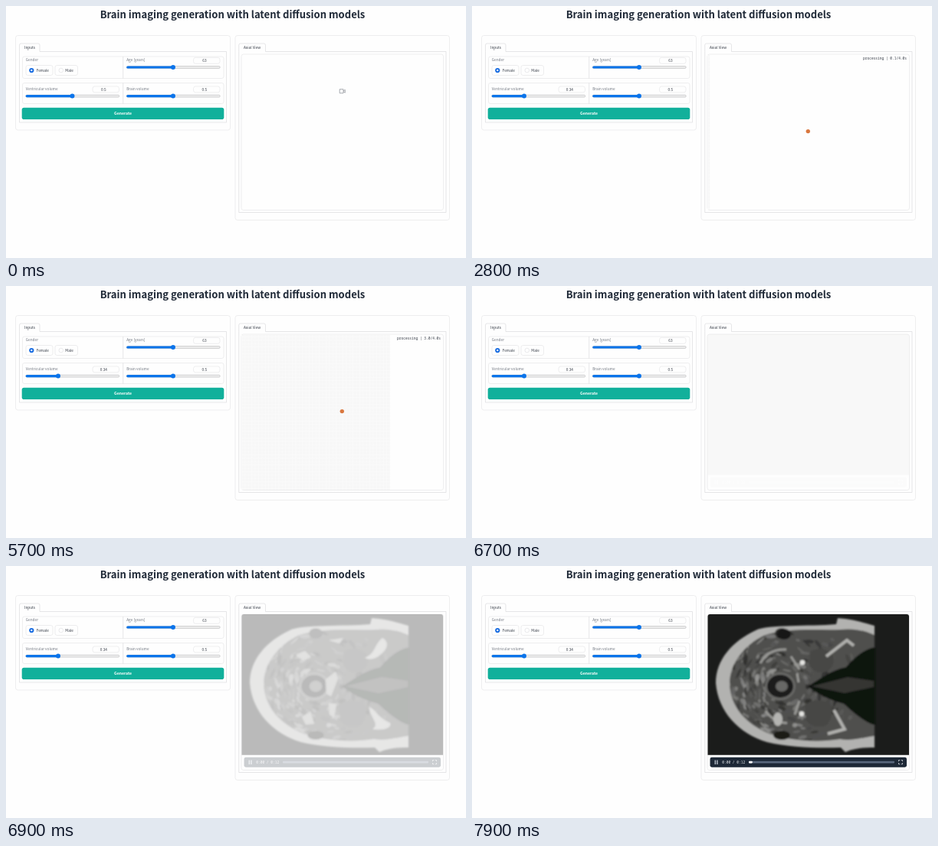
Animation, 600 px wide and 329 px high, one loop 8000 ms. Source, as an HTML page:

```html
<!DOCTYPE html>
<html lang="en">
<head>
<meta charset="utf-8">
<title>Brain imaging generation</title>
<style>
html, body { margin: 0; width: 100%; height: 100%; overflow: hidden; background: #fefefe; }
svg { display: block; width: 100vw; height: 100vh; }
text { font: 4.75px "Noto Sans CJK JP", "Noto Sans CJK SC", "Noto Sans CJK", "Open Sans", sans-serif; fill: #343a45; }
.title { font-size: 13.06px; font-weight: 600; fill: #1f2937; }
.label { fill: #737983; }
.mid { text-anchor: middle; }
.go { font-size: 5.1px; font-weight: 600; fill: #fff; }
.mono { font: 4.52px "Noto Sans Mono", "DejaVu Sans Mono", monospace; }
.box { fill: #fefefe; stroke: #e7e7e9; stroke-width: .7; }
.line { fill: none; stroke: #dcdcdf; stroke-width: .7; }
</style>
</head>
<body>
<svg viewBox="0 0 600 329" preserveAspectRatio="none">
  <defs>
    <pattern id="grid" width="4.4" height="4.4" patternUnits="userSpaceOnUse" x="307">
      <rect width="4.4" height="4.4" fill="#f7f7f7"/>
      <path d="M.4 0V4.4M0 .4H4.4" stroke="#fbfbfb" stroke-width=".8"/>
    </pattern>
    <filter id="soft" x="-10%" y="-10%" width="120%" height="120%"><feGaussianBlur stdDeviation="1.1"/></filter>
    <clipPath id="screen"><path d="M307.5 246.7V66Q307.5 63 310.5 63H567Q570 63 570 66V246.7Z"/></clipPath>
    <clipPath id="inside"><use href="#tissue"/></clipPath>
  </defs>

  <text class="title mid" x="295.5" y="15.7">Brain imaging generation with latent diffusion models</text>

  <rect class="box" x="12.5" y="38.5" width="280" height="123.5" rx="3"/>
  <path class="line" d="M17.5 59.5V51Q17.5 49 19.5 49H42Q44 49 44 51V59.5H287.5V152H17.5V59.5"/>
  <text x="24" y="56.3">Inputs</text>
  <rect class="box" x="21.5" y="66" width="262.5" height="28.5" rx="2.5"/>
  <rect class="box" x="21.5" y="100.5" width="262.5" height="27" rx="2.5"/>
  <path class="line" d="M152.7 66V94.5M152.7 100.5V127.5"/>
  <text class="label" x="25.8" y="72.3">Gender</text>
  <rect class="box" x="26" y="77.5" width="35" height="13" rx="2.5"/>
  <rect class="box" x="64" y="77.5" width="29.5" height="13" rx="2.5"/>
  <circle cx="33.3" cy="84" r="3.1" fill="#1268e0"/>
  <circle cx="33.3" cy="84" r="1.2" fill="#fff"/>
  <circle cx="71.8" cy="84" r="2.8" fill="#fff" stroke="#dcdce0" stroke-width=".6"/>
  <text x="39.7" y="85.8">Female</text>
  <text x="77.3" y="85.8">Male</text>
  <g id="sliders"></g>
  <rect x="20.7" y="132.8" width="263.6" height="15.2" rx="2.8" fill="#11b09b"/>
  <text class="go mid" x="152.5" y="142.4">Generate</text>

  <rect class="box" x="299" y="38.5" width="279.5" height="241" rx="3"/>
  <path class="line" d="M303.7 59.5V51Q303.7 49 305.7 49H336.5Q338.5 49 338.5 51V59.5H574V269.5H303.7V59.5"/>
  <text x="310" y="56.3">Axial View</text>
  <rect class="box" x="307" y="63" width="263.5" height="203.5" rx="2.8"/>
  <path id="camera" fill="none" stroke="#858990" stroke-width=".7" d="M435.2 108.7H440V113.8H435.2ZM440 110.8L442.3 109.4V113.2L440 111.8"/>

  <g id="busy">
    <rect id="fill" x="307" y="64" height="202" fill="url(#grid)"/>
    <circle cx="438.3" cy="163.6" r="2.7" fill="#d9773f"/>
    <text id="status" class="mono" x="567" y="69.5" text-anchor="end"></text>
  </g>

  <g id="video">
    <g clip-path="url(#screen)">
      <rect x="307" y="63" width="263" height="184" fill="#1b1c1b"/>
      <g id="scan" filter="url(#soft)">
        <path fill="#b2b2b0" d="M318 153C318 122 340 98 370 84C385 76 440 79 475 76L477 68C496 69 510 74 525 78V237C510 237 498 238 487 243L481 237C450 238 415 237 385 230C348 219 321 190 318 153Z"/>
        <path id="tissue" fill="#50504e" d="M336 152C337 126 356 103 380 91C410 80 450 84 480 83C498 81 512 84 525 90V222C510 224 496 229 480 226C450 231 415 228 388 219C358 207 336 184 336 152Z"/>
        <g id="mottle" clip-path="url(#inside)"></g>
        <path fill="#111211" d="M438 157C455 147 468 136 488 132C497 120 512 108 526 106V208C510 203 496 190 485 180C467 175 450 167 438 157Z"/>
        <path fill="#343533" d="M443 157L490 145L524 150V158L486 166Z"/>
        <path fill="#474745" d="M441 112Q456 103 470 115Q476 128 463 138Q448 142 440 130ZM434 181Q450 170 468 181Q473 196 462 208Q447 214 436 202Z"/>
        <ellipse cx="402" cy="157" rx="20" ry="18" fill="#686866"/>
        <ellipse cx="402" cy="157" rx="17" ry="15" fill="#1b1b1a"/>
        <ellipse cx="404" cy="157" rx="8" ry="7" fill="#686866"/>
        <ellipse cx="404" cy="88" rx="9" ry="7" fill="#2a2a29"/>
        <ellipse cx="404" cy="221" rx="11" ry="6" fill="#1a1a19"/>
        <g id="early">
          <path fill="#b1b1ae" d="M468 120C482 115 480 103 491 94C500 99 498 108 489 115C483 121 475 123 468 120ZM474 184C484 190 485 198 501 205C503 211 494 215 478 213C489 207 474 197 474 184Z"/>
          <path fill="#a0a09d" d="M378 116L390 111 398 119 387 123ZM386 197L397 190 402 206 391 207ZM421 97L440 94 435 101ZM417 148L430 138 433 147 424 170 418 167ZM421 179L431 180 428 198 422 194Z"/>
        </g>
        <g id="late">
          <path fill="none" stroke="#b0b0ad" stroke-width="4" d="M462 118L489 97L498 104M472 188L486 213L464 219"/>
          <path fill="none" stroke="#989895" stroke-width="3" d="M410 109C393 108 382 116 376 127M383 189C390 199 399 205 411 205M416 118L427 135M424 140L426 152M427 176L421 194"/>
          <ellipse cx="399" cy="200" rx="6" ry="9" fill="#b4b4b1"/>
          <ellipse cx="407" cy="89" rx="9" ry="7" fill="#151515"/>
          <circle cx="431" cy="126" r="3.2" fill="#e5e5e2"/>
          <circle cx="430" cy="193" r="3.2" fill="#e5e5e2"/>
        </g>
      </g>
    </g>
    <g id="bar">
      <rect x="310.5" y="249.7" width="256.5" height="13" rx="2.4" fill="#1d2836"/>
      <path stroke="#aeb6c1" stroke-width="1.5" d="M317.3 253.5V259M319.9 253.5V259"/>
      <text class="mono" x="326.3" y="257.9" style="fill:#e5e8ec">0:00 / 0:12</text>
      <rect x="361" y="254.8" width="190" height="2.6" rx=".8" fill="#59677c"/>
      <rect id="played" x="361" y="254.8" height="2.6" rx=".8" fill="#fff"/>
      <path fill="none" stroke="#d5d9df" stroke-width=".8" d="M556.5 255.2V253.5H558.2M559.8 253.5H561.5V255.2M561.5 257V258.7H559.8M558.2 258.7H556.5V257"/>
    </g>
  </g>
</svg>
<script>
const $ = id => document.getElementById(id);
const clamp = x => Math.max(0, Math.min(1, x));
const show = (el, on) => el.style.display = on ? '' : 'none';
const LOOP = 8000, START = 2700, DONE = 6600, PLAY = 7600;
const BLUE = '#0b74ea', HOVER = '#3c94ee';

function slider(x, y, label) {
  $('sliders').insertAdjacentHTML('beforeend', `
    <text class="label" x="${x}" y="${y - 7.8}">${label}</text>
    <rect class="box" x="${x + 87.3}" y="${y - 12.7}" width="34.5" height="8" rx="2.8"/>
    <text class="mid" x="${x + 101.7}" y="${y - 6.9}"></text>
    <rect x="${x}" y="${y - 1.4}" width="122" height="2.8" rx="1.4" fill="#efefef" stroke="#b6b6b8" stroke-width=".6"/>
    <rect x="${x}" y="${y - 1.6}" height="3.2" rx="1.6"/>
    <circle cy="${y}" r="3"/>`);
  const [text, , bar, thumb] = [...$('sliders').children].slice(-4);
  return (pos, color, shown) => {
    const length = 3 + pos * 115.5;
    text.textContent = shown;
    bar.setAttribute('width', length);
    thumb.setAttribute('cx', x + length);
    bar.setAttribute('fill', color);
    thumb.setAttribute('fill', color);
  };
}

slider(157.2, 80, 'Age [years]')(.5, BLUE, '63');
slider(157.2, 117.6, 'Brain volume')(.5, BLUE, '0.5');
const ventricles = slider(25.7, 117.6, 'Ventricular volume');
const drag = [.5, .46, .42, .38, .36, .35, .34];

// Seeded grey fibres that run around the centre of the head, darker to the right
let seed = 11;
const rnd = () => (seed = seed * 16807 % 2147483647) / 2147483647;
for (let i = 0; i < 330; i++) {
  const a = rnd() * 2 * Math.PI, r = 20 + rnd() * 55;
  const x = 404 + r * Math.cos(a) * (Math.cos(a) > 0 ? 1.6 : 1), y = 157 + r * Math.sin(a);
  const g = 35 + rnd() * (x > 435 ? 70 : 125) | 0;
  const turn = a * 180 / Math.PI + 60 + rnd() * 60;
  $('mottle').insertAdjacentHTML('beforeend',
    `<ellipse cx="${x}" cy="${y}" rx="${2 + rnd() * 6}" ry="${1 + rnd() * 2}" fill="rgb(${g},${g},${g - 2})" opacity=".75" transform="rotate(${turn} ${x} ${y})"/>`);
}

function draw(ms) {
  const t = Math.floor(ms % LOOP / 100) * 100;

  const v = drag[Math.max(0, Math.min(6, (t - 1400) / 100))];
  ventricles(v, t >= 1400 && t < 2300 ? HOVER : BLUE, String(v));

  show($('camera'), t < START);
  show($('busy'), t >= START && t < DONE);
  $('fill').setAttribute('width', 263 * clamp((t - START - 50) / 4000));
  $('status').textContent = `processing | ${((t - START) / 1000).toFixed(1)}/4.0s`;

  const fade = clamp((t - DONE) / 500) ** 2.4;
  $('video').style.opacity = fade;
  $('bar').style.opacity = .65 + .35 * fade;
  show($('scan'), t >= 6900);

  const slice = clamp((t - PLAY) / 300);
  $('early').style.opacity = 1 - slice;
  $('late').style.opacity = slice;
  $('played').setAttribute('width', 190 * Math.max(0, t - PLAY) / 12000);
}

const begin = performance.now();
function tick() {
  draw(performance.now() - begin);
  requestAnimationFrame(tick);
}
tick();
</script>
</body>
</html>
```
